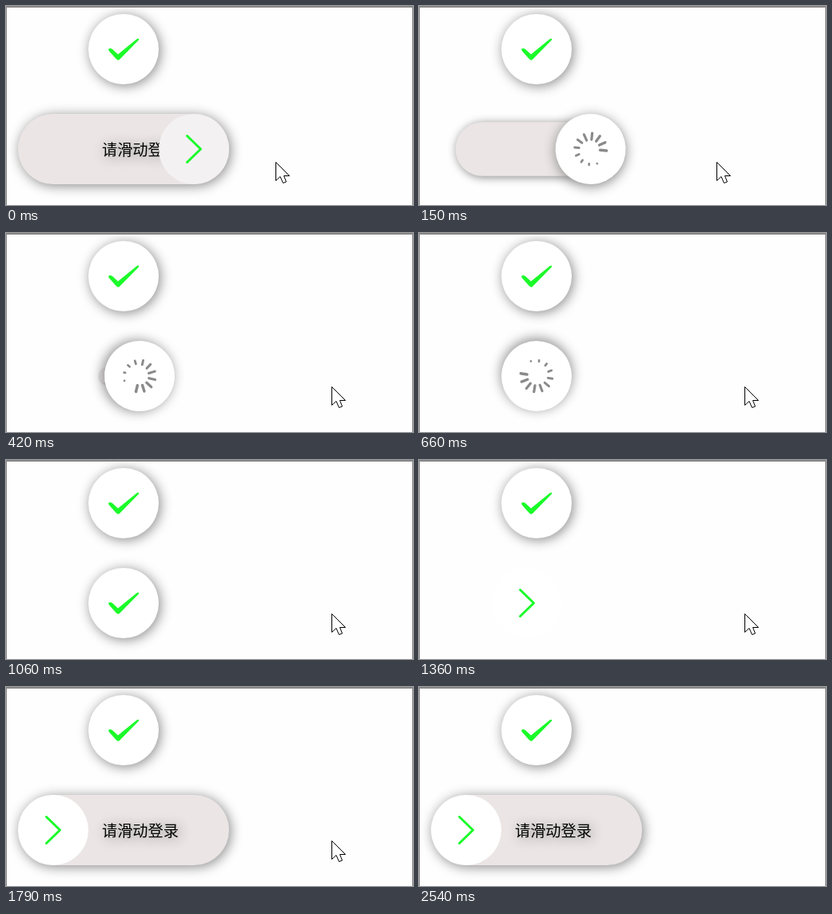
Animation, 509 px wide and 249 px high, one loop 3680 ms. Source, as an HTML page:

```html
<!DOCTYPE html>
<html lang="zh-CN">
<head>
<meta charset="utf-8">
<title>滑动登录</title>
<style>
html, body { margin: 0; width: 100%; height: 100%; overflow: hidden; background: #fefefe; }
body { position: relative; }
body > * { position: absolute; box-sizing: border-box; }
#edge { inset: 0; border: solid #868686; border-width: 2px 1px 0; }
.disc { width: 88px; height: 88px; left: 103px; border-radius: 50%; background: #fff; }
.disc svg { position: absolute; inset: 0; overflow: visible; }
.shadow { box-shadow: 2px 2px 15px #888; }
#done { top: 10px; }
#knob { top: 135px; }
#track {
  left: 15px; top: 135px; width: 264px; height: 88px; border-radius: 44px;
  background: #ebe5e5; font: 19.2px/88px "Noto Sans CJK SC", "Noto Sans CJK", sans-serif;
  color: #000; text-shadow: 2px 2px 15px #888; white-space: nowrap;
}
#label { position: absolute; left: 105px; top: 0; }
#pointer { left: 0; top: 0; }
</style>
</head>
<body>
<div id="edge"></div>
<div id="done" class="disc shadow">
  <svg width="88" height="88" viewBox="-44 -44 88 88">
    <path id="tick" fill="#1afa29" d="M-19 0Q-17-2-14 0L-7 6.5 17-13Q20-14 19-11.5L-5 13Q-7 14.500-9 12.500L-18 2.500Z"/>
  </svg>
</div>
<div id="track" class="shadow"><span id="label">请滑动登录</span></div>
<div id="knob" class="disc">
  <svg width="88" height="88" viewBox="-44 -44 88 88" fill="none" stroke-linecap="round">
    <path id="arrow" d="M-8.500-16.500L8.500 0-8.500 16.500" stroke="#1afa29" stroke-width="3" stroke-linejoin="round"/>
    <g id="spinner" stroke="#8a8a8a"></g>
    <use id="check" href="#tick"/>
  </svg>
</div>
<svg id="pointer" width="20" height="29">
  <path d="M.5.5V23.500L6 18.500 9.500 26.500 13.500 25 10.500 17.500H17.500Z" fill="#fff" stroke="#000"/>
</svg>
<script>
const $ = id => document.getElementById(id);
const LOOP = 3680;
const STEPS = [0, 150, 270, 420, 540, 660, 780, 930, 1060, 1360, 1480, 1630, 1790, 2420, 2540];
// time, x, y of the pointer tip
const POINTER = [[0, 337, 195], [150, 372, 195], [270, 405, 193], [420, 407, 192], [2420, 428, 231], [2540, 600, 300]];
const SHRINK = 34, LOADED = 780, GROW = 1292, SLIDE = 500;

const clamp = v => Math.min(1, Math.max(0, v));
const show = (id, on) => $(id).style.display = on ? "" : "none";

for (let i = 0; i < 11; i++) {
  const inner = 20 - Math.min(8, 0.3 + 1.3 * i);
  $("spinner").innerHTML +=
    `<path d="M${inner} 0H20" stroke-width="${2.5 + 0.1 * i}" transform="rotate(${24 + 30 * i})"/>`;
}

function draw(t) {
  const start = t < 150;
  const busy = !start && t < 1360;
  const spinning = busy && t < LOADED;
  const growing = t >= GROW;
  let scale = start ? 1 : 1 - clamp((t - SHRINK) / SLIDE);
  if (growing) scale = clamp((t - GROW) / SLIDE);
  if (t >= 1790) scale = 1;

  $("track").style.transform = `scale(${scale})`;
  show("label", !busy);

  const x = (growing ? -88 : 88) * scale;
  const turn = spinning ? 0.36 * (t - SHRINK) : 0;
  $("knob").style.transform = `translateX(${x}px) rotate(${turn}deg)`;
  $("knob").style.background = start ? "#f4f1f3" : "#fff";
  $("knob").classList.toggle("shadow", busy);
  show("arrow", !busy);
  show("spinner", spinning);
  show("check", busy && !spinning);
  $("check").style.opacity = clamp((t - 700) / 360);

  const [, px, py] = POINTER.findLast(p => p[0] <= t);
  $("pointer").style.transform = `translate(${px}px, ${py}px)`;
}

function tick(now) {
  const t = now % LOOP;
  draw(STEPS.findLast(s => s <= t));
  requestAnimationFrame(tick);
}
const origin = performance.now();
const frame = () => { tickAt(performance.now() - origin); requestAnimationFrame(frame); };
const tickAt = ms => draw(STEPS.findLast(s => s <= ms % LOOP));
frame();
</script>
</body>
</html>
```
